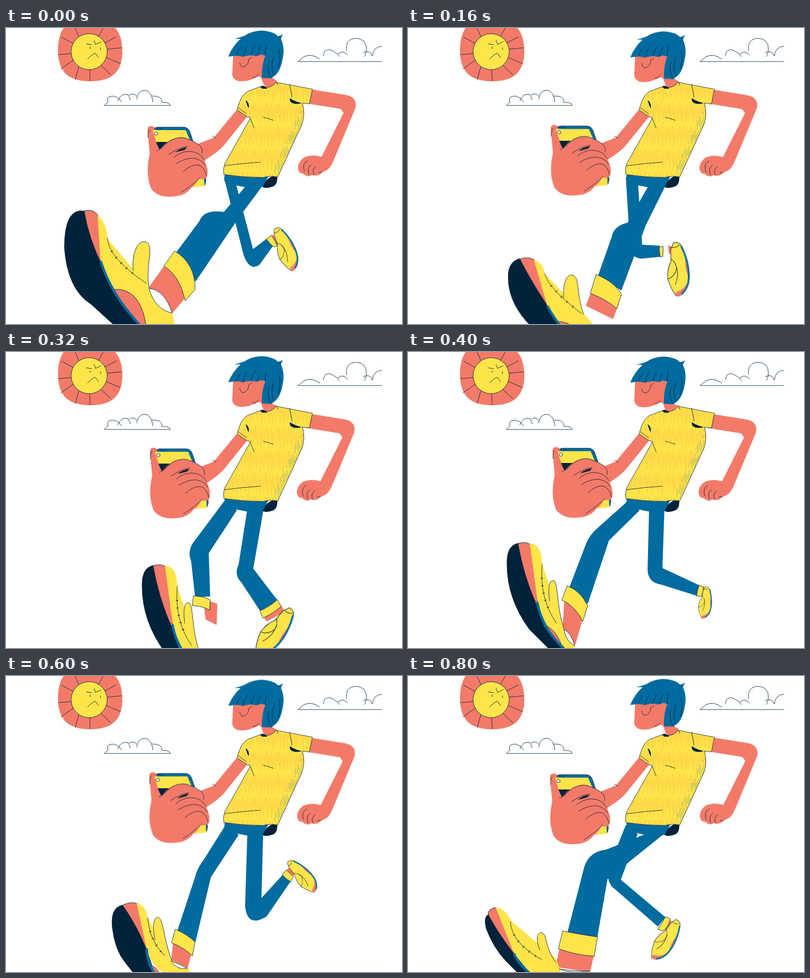
An HTML page without scripts for the animation above (880 ms loop, 800 by 600 pixels).

```html
<!DOCTYPE html>
<html lang="en">
<head>
<meta charset="utf-8">
<title>Runner with phone</title>
<style>
html, body { margin: 0; width: 100%; height: 100%; overflow: hidden; background: #fff }
svg { display: block; width: 800px; height: 600px; --coral: #f37a69; --yellow: #ffe44a; --blue: #006b9f; --navy: #00223a }
.c { fill: var(--coral) } .y { fill: var(--yellow) } .b { fill: var(--blue) } .n { fill: var(--navy) }
.l { fill: none } .l, .o { stroke: var(--navy); stroke-width: .9; stroke-linecap: round; stroke-linejoin: round }
.m { animation: 880ms steps(3) infinite }
.bob { animation: bob 880ms steps(10) infinite }

@keyframes bob { 45.4% { transform: translate(var(--x), var(--y)); animation-timing-function: steps(12) } }

/* Legs: hip, knee, ankle and back up */
@keyframes legR {
  0% { d: path("M488 316L440 373Q400 367 391 391L343 456L383 514L470 385L527 308Z"); animation-timing-function: steps(2) }
  9%, 13.6% { d: path("M484 321L437 382Q405 383 397 405L354 475L392 531L478 380L527 308Z") }
  27.2% { d: path("M487 322L456 420Q436 437 440 462L444 556L509 535L485 440L525 305Z"); animation-timing-function: steps(4) }
  45.4% { d: path("M487 322L484 440Q484 467 510 471L583 494L589 473L514 438L518 318Z") }
  59% { d: path("M489 322L492 460Q496 505 531 487L583 416L568 403L527 440L520 318Z"); animation-timing-function: steps(4) }
  77.2% { d: path("M486 322L474 472Q478 518 522 488L568 415L552 401L505 460L519 320Z") }
  90.9%, to { d: path("M478 321L400 352Q362 356 354 395L322 520L382 532L403 412L527 312Z") }
}
@keyframes legL {
  0% { d: path("M440 302L480 460Q492 494 512 480L540 441L527 427L499 448L465 318Z"); animation-timing-function: steps(2) }
  9%, 13.6% { d: path("M440 302L482 455Q492 487 517 471L546 437L532 422L503 442L465 318Z") }
  27.2% { d: path("M440 300L381 405Q362 432 388 460L438 517L462 480L413 434L465 320Z"); animation-timing-function: steps(4) }
  45.4% { d: path("M443 303L385 355Q367 370 360 388L326 477L363 511L406 382L468 321Z") }
  59% { d: path("M443 303L405 358Q393 372 388 385L339 483L372 524L415 410L472 322Z"); animation-timing-function: steps(4) }
  77.2% { d: path("M443 303L392 390Q379 408 376 430L354 548L393 556L413 405L468 322Z") }
  90.9%, to { d: path("M440 302L407 385Q398 418 418 432L505 508L520 489L430 413L464 320Z") }
}
@keyframes ankleR {
  0% { d: path("M330 468L370 538L336 578L288 526Z"); animation-timing-function: steps(2) }
  9%, 13.6% { d: path("M340 495L383 560L362 600L314 545Z") }
  27.2% { d: path("M445 575L514 550L519 570L450 599Z"); animation-timing-function: steps(4) }
  45.4% { d: path("M593 495L597 476L608 482L603 494Z") }
  59% { d: path("M587 409L577 395L583 390L593 400Z"); animation-timing-function: steps(4) }
  77.2% { d: path("M572 404L557 391L566 384L578 396Z") }
  90.9%, to { d: path("M309 537L379 550L368 600L298 590Z") }
}
@keyframes ankleL {
  0% { d: path("M547 441L537 421L548 417L552 432Z"); animation-timing-function: steps(2) }
  9%, 13.6% { d: path("M551 432L539 415L548 411L553 425Z") }
  27.2% { d: path("M480 510L498 491L513 513L494 524Z"); animation-timing-function: steps(4) }
  45.4% { d: path("M317 490L356 530L338 594L312 560Z") }
  59% { d: path("M329 498L364 543L344 588L320 560Z"); animation-timing-function: steps(4) }
  77.2% { d: path("M349 556L391 562L388 602L347 594Z") }
  90.9%, to { d: path("M518 515L529 494L537 502L532 524Z") }
}
@keyframes cuffR {
  0% { d: path("M341 452Q383 478 382 530L362 553Q350 500 319 483Z"); animation-timing-function: steps(2) }
  9%, 13.6% { d: path("M349 472Q388 498 393 545L375 575Q362 538 330 515Z") }
  27.2% { d: path("M443 555Q480 550 508 531L515 556Q480 575 446 584Z"); animation-timing-function: steps(4) }
  45.4% { d: path("M583 494Q584 484 588 473L597 476Q597 486 593 495Z") }
  59% { d: path("M583 418Q573 412 566 404L576 395Q582 404 588 409Z"); animation-timing-function: steps(4) }
  77.2% { d: path("M567 416Q557 411 550 402L556 391Q566 394 573 404Z") }
  90.9%, to { d: path("M313 517Q348 524 383 529L376 568Q340 566 304 553Z") }
}
@keyframes cuffL {
  0% { d: path("M541 444Q533 438 526 428L536 420Q543 430 548 441Z"); animation-timing-function: steps(2) }
  9%, 13.6% { d: path("M546 438Q537 432 530 421L538 414Q546 422 551 432Z") }
  27.2% { d: path("M436 515Q450 505 462 490L470 500Q455 515 442 525Z"); animation-timing-function: steps(4) }
  45.4% { d: path("M322 474Q350 485 363 515L353 546Q338 515 311 503Z") }
  59% { d: path("M336 481Q362 495 370 527L360 559Q350 528 321 514Z"); animation-timing-function: steps(4) }
  77.2% { d: path("M349 546Q370 552 394 551L393 576Q370 574 348 567Z") }
  90.9%, to { d: path("M505 513Q512 503 520 488L530 492Q527 508 515 517Z") }
}

/* Trailing shoes: heel position, direction and size */
@keyframes heelL {
  0% { transform: translate(548px, 405px) rotate(70deg) scale(1); animation-timing-function: steps(2) }
  9%, 13.6% { transform: translate(546px, 402px) rotate(63deg) scale(.95); visibility: visible; animation-timing-function: steps(2) }
  22.7%, 81.7% { transform: translate(541px, 468px) rotate(115deg) scale(1.4); visibility: hidden }
  81.8% { transform: translate(450px, 565px) rotate(150deg) scale(1.5); visibility: visible; animation-timing-function: steps(2) }
  90.9%, to { transform: translate(547px, 497px) rotate(125deg) scale(1) }
}
@keyframes heelR {
  0%, 36.2% { visibility: hidden }
  36.3% { transform: translate(578px, 523px) rotate(130deg) scale(1.2); visibility: visible; animation-timing-function: steps(2) }
  45.4% { transform: translate(605px, 476px) rotate(99deg) scale(.7) }
  59% { transform: translate(581px, 378px) rotate(62deg) scale(.84); animation-timing-function: steps(4) }
  77.2% { transform: translate(564px, 371px) rotate(39deg) scale(.92); visibility: visible; animation-timing-function: steps(2) }
  86.3%, to { transform: translate(430px, 470px) rotate(100deg) scale(1.4); visibility: hidden }
}

/* Shoes passing under the body */
@keyframes passL {
  0%, 22.6%, 36.3%, to { transform: translate(-90px, 5px); visibility: hidden }
  22.7% { transform: translate(28px, -28px); visibility: visible; animation-timing-function: steps(1) }
  27.2% { transform: translate(0, 0); visibility: visible; animation-timing-function: steps(1) }
  31.8% { transform: translate(-45px, 5px); visibility: visible; animation-timing-function: steps(1) }
}
@keyframes passR {
  0%, 22.6%, 36.3%, to { transform: translate(60px, 30px); visibility: hidden }
  22.7% { transform: translate(-22px, 82px); visibility: visible; animation-timing-function: steps(1) }
  27.2% { transform: translate(16px, 65px); visibility: visible; animation-timing-function: steps(1) }
  31.8% { transform: translate(40px, 45px); visibility: visible; animation-timing-function: steps(1) }
}

/* Leading shoe */
@keyframes lead {
  0%, 13.6% { transform: translate(0, 0); visibility: visible; animation-timing-function: steps(2) }
  22.7% { transform: translate(87px, 73px); visibility: hidden }
  36.3% { transform: translate(75px, 45px); visibility: hidden }
  36.4% { transform: translate(75px, 45px); visibility: visible; animation-timing-function: steps(2) }
  45.4%, 77.2% { transform: translate(0, 0); visibility: visible }
  81.8%, 86.3% { transform: translate(70px, -20px); visibility: hidden }
  86.4% { transform: translate(70px, -20px); visibility: visible; animation-timing-function: steps(1) }
  90.9%, to { transform: translate(0, 0); visibility: visible }
}
@keyframes sole {
  0% { d: path("M158 371Q118 364 118 445Q124 530 172 560L218 602L272 602Q175 480 158 371Z"); animation-timing-function: steps(2) }
  9%, 27.1% { d: path("M182 431Q156 438 159 475Q162 525 205 568L245 602L292 602Q222 510 182 431Z") }
  27.2%, 45.4% { d: path("M222 388Q199 392 200 430Q200 500 245 562L285 602L316 602Q246 520 222 388Z") }
  59% { d: path("M216 391Q183 395 186 450Q192 525 222 560L253 602L291 602Q262 510 216 391Z"); animation-timing-function: steps(4) }
  77.2%, 81.8% { d: path("M255 538Q240 542 243 565Q247 585 260 602L262 602L307 602Q298 546 255 538Z") }
  81.9%, to { d: path("M162 484Q152 488 158 512Q172 550 198 578L222 602L247 602Q195 545 162 484Z") }
}
@keyframes rim {
  0% { d: path("M157 371Q178 365 187 382Q196 430 191 472Q140 480 157 371Z"); animation-timing-function: steps(2) }
  9%, 27.1% { d: path("M182 432Q200 425 212 434Q240 490 238 527Q185 510 182 432Z") }
  27.2%, 45.4% { d: path("M222 388Q240 383 250 392Q268 450 262 507Q225 500 222 388Z") }
  59% { d: path("M216 391Q240 385 252 392Q270 450 262 502Q225 490 216 391Z"); animation-timing-function: steps(4) }
  77.2%, 81.8% { d: path("M255 538Q270 526 283 533Q312 570 307 602Q265 590 255 538Z") }
  81.9%, to { d: path("M162 484Q160 472 178 469Q205 510 214 562Q170 550 162 484Z") }
}
@keyframes upper {
  0% { d: path("M185 380Q203 393 205 427L289 527L336 580L341 602L271 602Q215 540 191 472Z"); animation-timing-function: steps(2) }
  9%, 27.1% { d: path("M211 434Q228 437 233 462L316 548L362 600L362 602L295 602Q262 565 238 527Z") }
  27.2%, 45.4% { d: path("M246 388Q270 388 271 430L314 560L337 598L337 602L316 602Q275 560 262 507Z") }
  59% { d: path("M250 392Q270 400 273 435L320 555L343 588L343 602L291 602Q268 560 261 502Z"); animation-timing-function: steps(4) }
  77.2%, 81.8% { d: path("M278 530Q292 525 300 545L340 592L398 600L398 602L345 602Q310 602 307 602Z") }
  81.9%, to { d: path("M177 469Q195 470 210 498L298 572L308 595L310 602L247 602Q232 585 214 562Z") }
}
@keyframes tongue {
  0% { d: path("M257 492C254 465 262 433 279 433C304 436 280 480 289 526"); animation-timing-function: steps(2) }
  9%, 27.1% { d: path("M271 510C270 490 272 464 288 464C305 468 295 500 312 545") }
  27.2%, 45.4% { d: path("M286 505C283 480 284 463 294 463C304 466 300 520 315 560") }
  59% { d: path("M280 485C280 455 284 436 294 436C309 440 305 480 320 555"); animation-timing-function: steps(4) }
  77.2%, 81.8% { d: path("M322 585C312 565 310 543 319 542C328 543 330 580 350 600") }
  81.9%, to { d: path("M266 555C258 535 260 520 270 520C282 524 276 550 298 580") }
}
@keyframes lace {
  0% { d: path("M205 426Q206 465 284 518"); animation-timing-function: steps(2) }
  9%, 27.1% { d: path("M233 461Q238 490 308 543") }
  27.2%, 45.4% { d: path("M271 430Q265 500 300 550") }
  59% { d: path("M273 435Q278 500 310 535"); animation-timing-function: steps(4) }
  77.2%, 81.8% { d: path("M300 545Q300 570 330 598") }
  81.9%, to { d: path("M207 498Q208 540 270 575") }
}
@keyframes sock {
  0% { d: path("M289 528Q320 530 336 578Q300 570 289 528Z"); animation-timing-function: steps(2) }
  9%, 27.1% { d: path("M322 567Q350 570 362 599Q340 600 322 567Z") }
  27.2%, 45.4% { d: path("M315 562Q330 570 337 596Q318 585 315 562Z") }
  59% { d: path("M322 562Q338 568 345 585Q330 590 322 562Z"); animation-timing-function: steps(4) }
  77.2%, 81.8% { d: path("M346 594Q365 600 388 600Q360 604 346 594Z") }
  81.9%, to { d: path("M306 594Q330 598 366 598Q330 604 306 594Z") }
}
@keyframes patch {
  0% { d: path("M218 530Q270 525 283 602L272 602Q235 560 218 530Z"); animation-timing-function: steps(2) }
  9%, 27.1% { d: path("M258 558Q300 560 312 602L292 602Q270 575 258 558Z") }
  27.2%, 45.4% { d: path("M272 552Q300 560 313 602L316 602Q290 580 272 552Z") }
  59% { d: path("M273 558Q300 565 311 602L292 602Q280 580 273 558Z"); animation-timing-function: steps(4) }
  77.2%, to { d: path("M300 610Q310 610 312 612L310 612Q305 612 300 610Z") }
}
@keyframes edge {
  0% { d: path("M191 472Q212 540 270 602"); animation-timing-function: steps(2) }
  9%, 27.1% { d: path("M238 527Q255 560 292 602") }
  27.2%, 45.4% { d: path("M261 507Q270 560 316 602") }
  59% { d: path("M261 502Q262 550 291 602"); animation-timing-function: steps(4) }
  77.2%, 81.8% { d: path("M307 602Q307 603 308 604") }
  81.9%, to { d: path("M214 562Q220 580 245 602") }
}
</style>
</head>
<body>
<svg viewBox="0 0 800 600">
  <defs>
    <pattern id="weave" width="23" height="47" patternUnits="userSpaceOnUse" patternTransform="rotate(1)">
      <path d="M2 3V31M5 9V40M9 1V26M12 14V44M15 5V33M19 10V38M22 2V22" stroke="#f6a340" stroke-width=".9" opacity=".6"/>
    </pattern>
    <pattern id="hatch" width="7" height="31" patternUnits="userSpaceOnUse" patternTransform="rotate(8)">
      <path d="M1 2V22M4.5 10V29" stroke="#4f9a86" stroke-width=".9" opacity=".7"/>
    </pattern>
    <path id="shirt" d="M517 118Q532 126 546 110L619 124L613 154L599 152Q605 175 598 195L549 302Q530 299 520 303Q480 303 440 297Q438 285 442 275L494 182L484 178L467 166Q475 132 492 127Z"/>
    <g id="shoe">
      <path class="y o" d="M0 6Q-2-6 8-8Q40-24 70-19Q95-10 92 3Q80 12 62 17Q45 18 32 11L12 11Z"/>
      <path class="c" d="M22-14Q42-12 58-18Q42-21 22-14ZM66-19Q96-12 92 3Q86 6 84 0Q82-10 66-19Z"/>
      <path d="M6-7Q40-23 70-18Q82-15 89-6" fill="none" stroke="var(--blue)" stroke-width="3"/>
      <path class="l" d="M28 11Q38-2 50 3Q62 10 62 17M36 4Q52-4 72 4M4-4Q10 2 8 10"/>
    </g>
    <g id="side">
      <path class="y o" d="M510 505Q530 496 540 503Q536 525 508 545L445 580L377 590L375 570Q400 556 420 556Q414 542 430 541L448 540L485 531Q505 522 510 505Z"/>
      <path class="c" d="M375 572Q410 580 446 570L490 553L508 545L445 581L377 591Z"/>
      <path d="M539 505Q532 525 508 543" fill="none" stroke="var(--blue)" stroke-width="4"/>
      <path class="l" d="M375 572Q410 580 446 570M420 556L445 555M404 560Q420 568 440 564M520 500Q528 508 526 522M524 500Q532 508 530 518"/>
    </g>
  </defs>

  <!-- Sky -->
  <path class="c" d="M105 45C105 15 115-12 140-12H205C228 0 235 20 235 50C234 88 215 108 170 108C125 108 105 88 105 45Z"/>
  <circle class="y o" cx="168" cy="48" r="36.5"/>
  <path class="l" d="M205 43L234 40M203 60L231 72M192 76L212 95M169 85L170 107M147 79L140 104M136 65L111 83M131 52L106 54M135 31L113 19M147 17L140 1M187 17L196 1M200 30L223 18M162 32L173 34M181 33L178 25M181 33L192 28M170 38V42M191 40V44M165 63Q173 54 180 51Q183 54 187 60"/>
  <path class="l" d="M199 157H332Q330 150 315 151Q316 137 295 138M199 157L206 150Q202 138 216 138Q226 139 234 150M226 148Q232 131 246 135Q250 140 251 146M249 136Q258 130 264 138M264 144Q266 127 280 126Q294 127 297 150"/>
  <path class="l" d="M759 68H590L602 58Q618 51 634 63M641 56Q643 42 655 44Q668 50 674 58M670 53Q680 43 690 55M688 46Q685 21 708 21Q728 22 728 42Q728 52 724 58M722 50Q735 43 740 57Q742 38 759 37"/>

  <!-- Legs -->
  <path class="b" d="M442 290L441 310L465 319L490 324L520 322L530 300Z"/>
  <path class="b m" style="animation-name:legL"/>
  <path class="c m" style="animation-name:ankleL"/>
  <use href="#shoe" class="m" style="animation-name:heelL"/>
  <use href="#side" class="m" style="animation-name:passL"/>
  <path class="y o m" style="animation-name:cuffL"/>
  <path class="b m" style="animation-name:legR"/>
  <path class="c m" style="animation-name:ankleR"/>
  <use href="#shoe" class="m" style="animation-name:heelR"/>
  <use href="#side" class="m" style="animation-name:passR"/>
  <path class="y o m" style="animation-name:cuffR"/>
  <path class="n" d="M519 322Q526 300 548 299Q549 317 540 321Q528 326 519 323Z"/>

  <g class="m" style="animation-name:lead">
    <path class="c o m" style="animation-name:rim"/>
    <path class="n o m" style="animation-name:sole"/>
    <path class="y m" style="animation-name:upper"/>
    <path class="c o m" style="animation-name:patch"/>
    <path class="m" style="animation-name:edge" fill="none" stroke="var(--blue)" stroke-width="5"/>
    <path class="y o m" style="animation-name:tongue"/>
    <path class="l m" style="animation-name:lace"/>
    <path class="m" style="animation-name:lace" fill="none" stroke="var(--navy)" stroke-width="5" stroke-dasharray="0 28 1.2 14 1.2 14 1.2 14 1.2 14 1.2 99"/>
    <path class="o m" style="animation-name:sock" fill="#fff"/>
  </g>

  <!-- Arms -->
  <g class="bob" style="--x:-3px;--y:1px">
    <path class="c" d="M608 123L688 136Q710 141 706 162L662 268Q652 292 640 290L637 262L682 172L676 164L608 153Z"/>
    <path class="c" d="M640 262Q620 255 603 262Q590 270 590 285Q592 296 600 295Q610 304 618 298Q630 302 638 293Q652 288 655 275Z"/>
    <path class="l" d="M609 269Q597 275 603 291M612 297Q607 284 616 278M622 297Q617 287 626 281M638 292L631 293"/>
  </g>
  <path class="c" d="M466 166L420 222L385 236L398 270Q428 252 440 238L490 176Z"/>
  <path class="l" d="M417 219L424 223"/>

  <!-- Head -->
  <g class="bob" style="--x:0px;--y:4px">
    <path class="c" d="M459 54L457 95Q460 108 476 108Q492 108 510 98L515 100L521 116L548 118L546 106L536 100L528 98L530 50Z"/>
    <path class="b" d="M449 58Q458 36 474 22L461 22Q482 17 488 12Q510 2 530 7Q542 9 550 17L560 13L555 21Q564 40 559 62Q555 85 545 95L536 102L517 101Q516 75 524 56L516 54L505 57L495 55L478 58L466 56Z"/>
    <path class="l" d="M472 70Q474 82 483 78Q491 72 490 64L497 59M499 100Q507 100 510 94M466 56Q468 46 474 40M479 58Q481 46 487 38M495 55Q497 44 503 36M508 56Q509 46 515 38M524 56Q522 46 527 36M535 100Q526 85 531 68M541 95Q533 78 541 58M550 82Q556 65 552 45M550 17L556 21"/>
  </g>

  <!-- Shirt -->
  <path class="c" d="M519 119L546 107L548 118L535 124Z"/>
  <use href="#shirt" class="y o"/>
  <use href="#shirt" fill="url(#weave)"/>
  <path fill="url(#hatch)" d="M590 175L601 165L598 195L549 301L536 299Z"/>
  <path class="n" d="M513 119L519 117Q525 119 528 123L518 123ZM573 142Q585 150 598 152Q582 157 574 149ZM484 146Q493 152 490 163L487 156Z"/>
  <path class="l" d="M520 181L528 183L540 187M442 279Q480 274 514 272M493 182L501 202M573 114L578 140M470 162L486 174M547 110L549 116"/>

  <!-- Hand and phone -->
  <g class="bob" style="--x:6px;--y:-6px">
    <path class="c" d="M286 208Q285 197 296 199Q304 202 300 215L310 250L291 262Z"/>
    <path class="b o" d="M300 203Q302 201 306 201H360Q369 202 372 212L404 308L402 318L380 322Z"/>
    <path class="y" d="M296 207H363L372 228L400 305L401 321L372 323L304 232Z"/>
    <path class="n" d="M303 231H348L374 242L345 252L312 252Z"/>
    <circle class="o" cx="303" cy="214" r="3.3" fill="#fff"/>
    <path class="c" d="M298 225L305 249Q312 246 320 236Q340 218 362 223Q378 228 390 237Q398 245 396 254Q404 262 402 272Q411 290 405 304Q397 308 390 305Q382 320 375 323Q366 336 350 340Q308 348 293 325Q283 300 288 268Q291 250 296 237Z"/>
    <path class="n" d="M342 252Q352 243 366 242L361 247Z"/>
    <path class="l" d="M287 222Q286 212 290 206M305 249Q316 244 322 236Q342 218 362 223Q378 228 390 237Q398 245 396 254M329 256Q348 243 366 240M340 262Q352 251 370 250Q392 251 400 267M344 275Q362 263 380 264Q398 268 403 279M358 291Q375 275 390 278Q402 284 405 300M354 333Q378 318 392 303M303 204H315"/>
  </g>
</svg>
</body>
</html>
```
